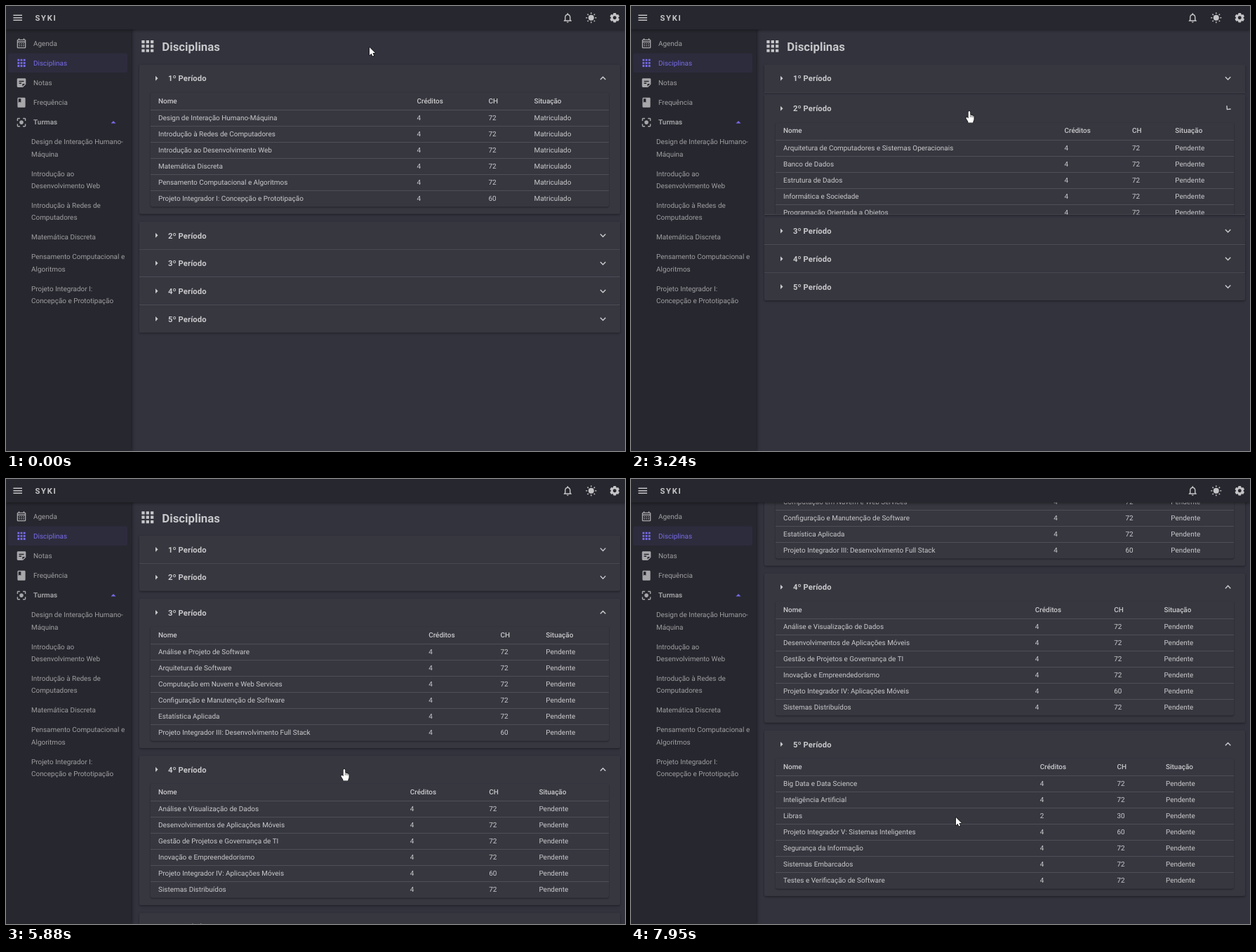
These frames come from a looping animation (882x635 px, 7990 ms). An HTML page with a canvas:

```html
<!DOCTYPE html>
<html lang="pt-BR">
<head>
<meta charset="utf-8">
<title>Disciplinas</title>
<style>
  html, body { margin: 0; width: 100%; height: 100%; overflow: hidden; background: #32333d; }
  canvas { display: block; }
</style>
</head>
<body>
<canvas id="stage" width="882" height="635"></canvas>
<script>
const ctx = document.getElementById('stage').getContext('2d');
const W = 882, H = 635, LOOP = 7990;
const BAR = '#27272f', PAGE = '#32333d', SURFACE = '#373740', PRIMARY = '#776be7';
const TEXT = 'rgba(255,255,255,.73)', MUTED = 'rgba(255,255,255,.55)', LINE = 'rgba(255,255,255,.12)';

// Layout of the accordion
const FIRST = 103.2, HEAD = 39.1, PITCH = 39.75, GAP = 10.4, ROW = 23;
const LEFT = 190, RIGHT = 875;

// Each panel: column positions, subjects, and toggles as [time, open, duration]
const panels = [
  { cols: [585.5, 687.5, 752.5], status: 'Matriculado', start: 1, toggles: [[2020, 0, 440]],
    rows: ['Design de Interação Humano-Máquina', 'Introdução à Redes de Computadores',
      'Introdução ao Desenvolvimento Web', 'Matemática Discreta',
      'Pensamento Computacional e Algoritmos', 'Projeto Integrador I: Concepção e Prototipação'] },
  { cols: [617.5, 714, 775.3], start: 0, toggles: [[700, 1, 400], [3130, 0, 440]],
    rows: ['Arquitetura de Computadores e Sistemas Operacionais', 'Banco de Dados',
      'Estrutura de Dados', 'Informática e Sociedade', 'Programação Orientada a Objetos',
      'Projeto Integrador II: Modelagem de Banco de Dados'] },
  { cols: [602.2, 704.5, 769.3], start: 0, toggles: [[3980, 1, 400]],
    rows: ['Análise e Projeto de Software', 'Arquitetura de Software',
      'Computação em Nuvem e Web Services', 'Configuração e Manutenção de Software',
      'Estatística Aplicada', 'Projeto Integrador III: Desenvolvimento Full Stack'] },
  { cols: [575.8, 688.2, 759.4], start: 0, toggles: [[5240, 1, 400]],
    rows: ['Análise e Visualização de Dados', 'Desenvolvimentos de Aplicações Móveis',
      'Gestão de Projetos e Governança de TI', 'Inovação e Empreendedorismo',
      'Projeto Integrador IV: Aplicações Móveis', 'Sistemas Distribuídos'] },
  { cols: [582.8, 692.5, 762], start: 0, toggles: [[6620, 1, 400]],
    rows: ['Big Data e Data Science', 'Inteligência Artificial', 'Libras',
      'Projeto Integrador V: Sistemas Inteligentes', 'Segurança da Informação',
      'Sistemas Embarcados', 'Testes e Verificação de Software'] }
];

// Pointer tip: [time, x, y]
const pointer = [
  [0, 518, 59], [20, 518, 59], [560, 511, 321], [1450, 511, 321], [1980, 479.5, 108],
  [2400, 479.5, 108], [2730, 482, 150], [3560, 482, 150], [3850, 483, 180],
  [4450, 483, 180], [5110, 482, 414], [6230, 482, 414], [6590, 478, 568],
  [6900, 478, 568], [7180, 469, 516], [7300, 469, 516], [7830, 463, 494], [7950, 463, 483], [LOOP, 463, 483]
];
const scrolls = [[5848, 6080, 66], [7190, 7830, 197]];

const clamp = v => Math.max(0, Math.min(1, v));

function bezier(x1, x2) {
  // Ease with y control points 0 and 1
  return x => {
    x = clamp(x);
    let lo = 0, hi = 1;
    for (let i = 0; i < 24; i++) {
      const s = (lo + hi) / 2, r = 1 - s;
      if (3 * r * r * s * x1 + 3 * r * s * s * x2 + s * s * s < x) lo = s; else hi = s;
    }
    return 3 * lo * lo - 2 * lo * lo * lo;
  };
}
const standard = bezier(.4, .2), inOut = bezier(.42, .58);

function openness(p, t, duration) {
  let v = p.start;
  for (const [at, to, d] of p.toggles) v += (to - v) * standard((t - at) / (duration || d));
  return v;
}

function pointerAt(t) {
  const i = Math.max(1, pointer.findIndex(k => k[0] >= t));
  const [t0, x0, y0] = pointer[i - 1], [t1, x1, y1] = pointer[i];
  const u = inOut((t - t0) / (t1 - t0));
  return [x0 + (x1 - x0) * u, y0 + (y1 - y0) * u];
}

const scrollAt = t => scrolls.reduce((s, [a, b, d]) => s + d * inOut((t - a) / (b - a)), 0);

// Drawing helpers; text is placed by the middle of its capitals, on a whole-pixel baseline
function text(str, x, y, { size = 9.95, weight = 400, color = TEXT, spacing = 0 } = {}) {
  ctx.font = `${weight} ${size}px Roboto, sans-serif`;
  ctx.letterSpacing = spacing + 'px';
  ctx.textRendering = 'geometricPrecision';
  ctx.fillStyle = color;
  ctx.fillText(str, x, Math.round(y + size * .355));
}

function box(x, y, w, h, color, r = 0) {
  ctx.fillStyle = color;
  ctx.beginPath();
  ctx.roundRect(x, y, w, h, r);
  ctx.fill();
}

function shadowed(blur, dx, dy, alpha, draw) {
  ctx.save();
  ctx.shadowColor = `rgba(0,0,0,${alpha})`;
  ctx.shadowBlur = blur;
  ctx.shadowOffsetX = dx;
  ctx.shadowOffsetY = dy;
  draw();
  ctx.restore();
}

function poly(points, color) {
  ctx.fillStyle = color;
  ctx.beginPath();
  points.forEach(([x, y]) => ctx.lineTo(x, y));
  ctx.fill();
}

function icon(path, x, y, color, size = 16.8) {
  ctx.save();
  ctx.translate(x, y);
  ctx.scale(size / 24, size / 24);
  ctx.translate(-12, -12);
  ctx.fillStyle = color;
  ctx.fill(path, 'evenodd');
  ctx.restore();
}

const bell = new Path2D('M12 22c1.1 0 2-.9 2-2h-4c0 1.1.9 2 2 2zM18 16v-5c0-3.07-1.63-5.64-4.5-6.32V4c0-.83-.67-1.5-1.5-1.5s-1.5.67-1.5 1.5v.68C7.64 5.36 6 7.92 6 11v5l-2 2v1h16v-1zM16 17H8v-6c0-2.48 1.51-4.5 4-4.5s4 2.02 4 4.5z');
const note = new Path2D('M19 3H5C3.9 3 3 3.9 3 5v14c0 1.1.9 2 2 2h10l6-6V5c0-1.1-.9-2-2-2zM7 8h10v2H7zM12 14H7v-2h5zM14 19.5V14h5.5z');
const book = new Path2D('M18 2H6c-1.1 0-2 .9-2 2v16c0 1.1.9 2 2 2h12c1.1 0 2-.9 2-2V4c0-1.1-.9-2-2-2zM6 4h5v8l-2.5-1.5L6 12z');
const focus = new Path2D('M12 8a4 4 0 1 0 0 8a4 4 0 1 0 0-8zM5 15H3v4c0 1.1.9 2 2 2h4v-2H5zM5 5h4V3H5c-1.1 0-2 .9-2 2v4h2zM19 3h-4v2h4v4h2V5c0-1.1-.9-2-2-2zM19 19h-4v2h4c1.1 0 2-.9 2-2v-4h-2z');
const menu = new Path2D('M3 6h18v2H3zM3 11h18v2H3zM3 16h18v2H3z');
const arrow = new Path2D('M0 0V11.2L2.6 8.8 4.3 12.6 6.1 11.8 4.5 8.1H8z');
const hand = new Path2D('M-1.3 1Q0-.8 1.3 1V5.6Q2.4 5 3.2 6.1 4.4 5.6 5.1 6.8 6.6 6.5 6.6 8.2V11.5Q6.6 13.3 5.4 15V16.4H-1.6V15L-4.3 10.7Q-5 9.2-3.8 8.7-2.7 8.5-1.3 10.2z');

const calendar = new Path2D('M19 4h-1V2h-2v2H8V2H6v2H5c-1.1 0-2 .9-2 2v14c0 1.1.9 2 2 2h14c1.1 0 2-.9 2-2V6c0-1.1-.9-2-2-2zM19 20H5V10h14zM19 8H5V6h14z');
for (let i = 0; i < 6; i++) calendar.rect(7 + i % 3 * 4, i < 3 ? 12 : 16, 2, 2);

const apps = new Path2D();
for (let i = 0; i < 9; i++) apps.rect(4 + i % 3 * 6, 4 + Math.floor(i / 3) * 6, 4, 4);

const gear = new Path2D();
for (let i = 0; i < 6; i++) {
  for (const [r, a] of [[7.3, -.5], [10, -.24], [10, .24], [7.3, .5]]) {
    const th = i * Math.PI / 3 - Math.PI / 2 + a;
    gear.lineTo(12 + r * Math.cos(th), 12 + r * Math.sin(th));
  }
}
gear.closePath();
gear.moveTo(15.5, 12);
gear.arc(12, 12, 3.5, 0, 7);

function sun(x, y) {
  ctx.save();
  ctx.translate(x, y);
  ctx.fillStyle = TEXT;
  ctx.beginPath();
  ctx.arc(0, 0, 4, 0, 7);
  ctx.fill();
  for (let i = 0; i < 8; i++) {
    ctx.rotate(Math.PI / 4);
    ctx.fillRect(5.5, -.7, 2, 1.4);
  }
  ctx.restore();
}

function chevron(x, y, open) {
  ctx.save();
  ctx.translate(x, y);
  ctx.rotate(open * Math.PI);
  ctx.strokeStyle = 'rgba(255,255,255,.75)';
  ctx.lineWidth = 1.4;
  ctx.beginPath();
  ctx.moveTo(-3.7, -1.9);
  ctx.lineTo(0, 1.9);
  ctx.lineTo(3.7, -1.9);
  ctx.stroke();
  ctx.restore();
}

function table(p, c) {
  const bottom = c + 45.3 + p.rows.length * ROW;
  shadowed(2, 0, 1, .4, () => box(206, c + 20, 653, bottom - c - 20, SURFACE, 3));
  const cells = (values, y, weight) =>
    values.forEach((v, i) => text(v, i ? p.cols[i - 1] : 217, y, { weight }));
  cells(['Nome', 'Créditos', 'CH', 'Situação'], c + 31.8, 500);
  p.rows.forEach((name, i) => {
    const y = c + 56 + i * ROW;
    box(206, Math.round(y - 11.4), 653, 1, LINE);
    const short = name === 'Libras', project = name.startsWith('Projeto Integrador');
    cells([name, short ? '2' : '4', short ? '30' : project ? '60' : '72', p.status || 'Pendente'], y, 400);
  });
}

function layout(t) {
  let c = FIRST - scrollAt(t);
  const list = panels.map((p, i) => ({
    p, i, open: openness(p, t), turn: openness(p, t, 220), gap: openness(p, t, 250)
  }));
  list.forEach((q, i) => {
    const next = list[i + 1];
    q.c = c;
    q.body = q.open * (36 + q.p.rows.length * ROW);
    q.space = next ? Math.max(q.gap, next.gap) : 1;
    c += PITCH + q.body + q.space * GAP;
  });
  return list;
}

function content(list, scroll) {
  box(0, 0, W, H, PAGE);
  icon(apps, 201.8, 57.4 - scroll, TEXT, 25.4);
  text('Disciplinas', 222.3, 58.4 - scroll, { size: 16.8, weight: 700 });
  for (const q of list) {
    const top = q.c - HEAD / 2, h = HEAD + q.body + .6 * (1 - q.space);
    shadowed(3, 0, 1.2, .4, () => box(LEFT, top, RIGHT - LEFT, h, SURFACE, q.space > .5 ? 2 : 0));
  }
  for (const q of list) {
    const { c, p } = q;
    if (q.body > .5) {
      ctx.save();
      ctx.beginPath();
      ctx.rect(LEFT, c + HEAD / 2, RIGHT - LEFT, q.body);
      ctx.clip();
      table(p, c);
      ctx.restore();
    }
    poly([[213, c - 3.5], [216.5, c], [213, c + 3.5]], TEXT);
    text(`${q.i + 1}º Período`, 231, c + .2, { size: 11.2, weight: 700, spacing: .1 });
    chevron(850.6, c, q.turn);
    if (q.space < 1) {
      ctx.globalAlpha = 1 - q.space;
      box(LEFT, Math.round(c + 19.3 + q.body), RIGHT - LEFT, 1, LINE);
      ctx.globalAlpha = 1;
    }
  }
}

const nav = [['Agenda', calendar, 53], ['Disciplinas', apps, 81], ['Notas', note, 109.3],
  ['Frequência', book, 137.5], ['Turmas', focus, 165.8]];
const classes = [['Design de Interação Humano-', 193.8], ['Máquina', 211], ['Introdução ao', 239],
  ['Desenvolvimento Web', 256.3], ['Introdução à Redes de', 284.2], ['Computadores', 301.5],
  ['Matemática Discreta', 329.5], ['Pensamento Computacional e', 357.8], ['Algoritmos', 375],
  ['Projeto Integrador I:', 403.2], ['Concepção e Prototipação', 420.3]];

function frame() {
  shadowed(4, 1, 0, .4, () => box(0, 0, 178.5, H, BAR));
  box(3, 67.5, 170, 27.5, 'rgba(119,107,231,.08)', 3);
  nav.forEach(([label, path, y], i) => {
    const color = i === 1 ? PRIMARY : MUTED;
    icon(path, 22, y + .3, i === 1 ? PRIMARY : 'rgba(255,255,255,.6)');
    text(label, 39, y, { color, weight: i === 4 ? 700 : 400 });
  });
  poly([[149.5, 167.5], [153, 164], [156.5, 167.5]], PRIMARY);
  classes.forEach(([label, y]) => text(label, 36, y, { color: MUTED }));

  shadowed(4, 0, 1, .4, () => box(0, 0, W, 33.5, BAR));
  icon(menu, 16.7, 16.8, TEXT);
  text('SYKI', 41.5, 16.8, { size: 11.2, weight: 700, spacing: 1.7 });
  icon(bell, 800.3, 16.8, TEXT);
  sun(833.8, 16.8);
  icon(gear, 867.3, 16.8, TEXT);
}

function cursor(t, list) {
  const [x, y] = pointerAt(t);
  const overHead = list.some(q => Math.abs(y - q.c) < HEAD / 2);
  const shape = overHead ? hand : arrow;
  ctx.save();
  ctx.translate(x, y);
  ctx.lineJoin = 'round';
  ctx.strokeStyle = '#111';
  ctx.lineWidth = 1.4;
  ctx.stroke(shape);
  ctx.fillStyle = '#fff';
  ctx.fill(shape);
  if (overHead) {
    ctx.lineWidth = .6;
    ctx.stroke(new Path2D('M1.3 6V8.6M3.2 6.4V8.8M5.1 7V9'));
  }
  ctx.restore();
}

function draw(now) {
  const t = now % LOOP, list = layout(t);
  content(list, scrollAt(t));
  frame();
  cursor(t, list);
}

const begin = performance.now();
function tick() {
  draw(performance.now() - begin);
  requestAnimationFrame(tick);
}
tick();
</script>
</body>
</html>
```
